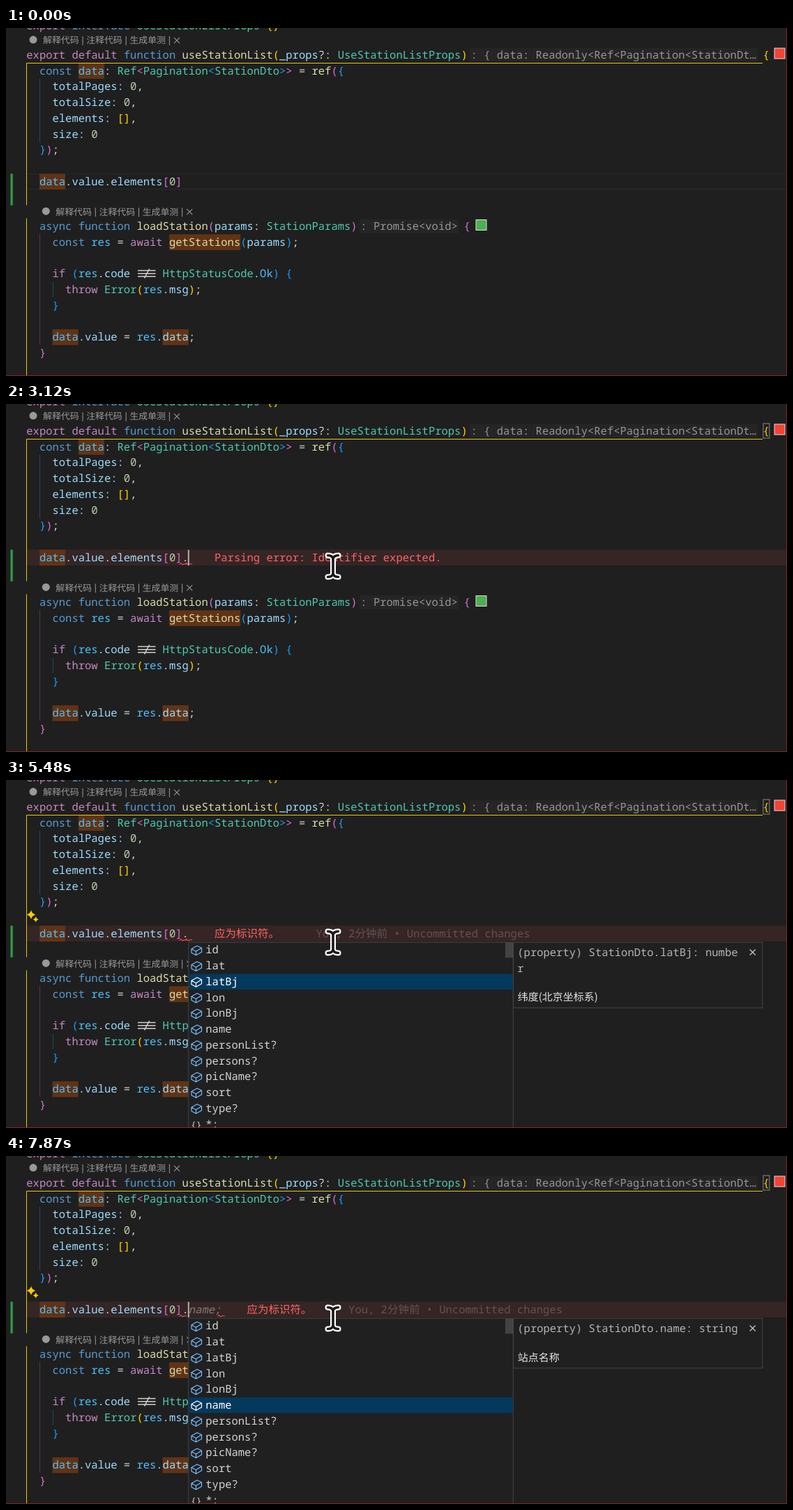
Recreate the animation shown at these times as an HTML page. Size 1120x500 px, loop 8 s.

```html
<!DOCTYPE html>
<html lang="zh-CN">
<head>
<meta charset="utf-8">
<title>Editor completion</title>
<style>
html, body { margin: 0; width: 100%; height: 100%; overflow: hidden; background: #1f1f1f; }
svg { display: block; width: 100%; height: 100%; }
text { font: 500 15.5px "Noto Sans Mono", "Noto Sans CJK SC", "Noto Sans CJK", monospace; white-space: pre;
  text-rendering: geometricPrecision; font-variant-ligatures: none; }
.ui { font: 500 15px "Noto Sans CJK SC", "Noto Sans CJK", sans-serif; }
.lens { font-size: 12.9px; font-weight: 400; }
.small { font-size: 13px; }
.ghost { font-style: italic; }
</style>
</head>
<body>
<svg viewBox="0 0 1120 500">
  <g id="code"></g><g id="live"></g>
  <path d="M0 499.5H1119.5V0" fill="none" stroke="#8a2323"/>
</svg>
<script>
const CW = 9.3, LH = 22.75, X0 = 29.3, ROW = 220.6, LOOP = 8000;
const col = n => X0 + n * CW;
const COLORS = {
  k: '#c586c0', b: '#569cd6', f: '#dcdcaa', v: '#9cdcfe', c: '#4fc1ff', t: '#4ec9b0',
  n: '#b5cea8', w: '#d4d4d4', y: '#ffd700', o: '#da70d6', u: '#179fff', h: '#969696'
};
const GOLD = '#e6c619', MARK = '#613315';

// SVG helpers; text is placed by the middle of its line
const text = (x, y, s, fill, cls = '') =>
  `<text x="${x}" y="${y + 5.2}" fill="${fill}" class="${cls}">${s.replace(/&/g, '&amp;').replace(/</g, '&lt;')}</text>`;
const rect = (x, y, w, h, fill, stroke = 'none') =>
  `<rect x="${x}" y="${y}" width="${w}" height="${h}" fill="${fill}" stroke="${stroke}"/>`;
const path = (d, stroke, w = 1, extra = '') =>
  `<path d="${d}" fill="none" stroke="${stroke}" stroke-width="${w}" ${extra}/>`;
const cross = (x, y, r, c) => path(`M${x - r} ${y - r}l${2 * r} ${2 * r}m0 ${-2 * r}l${-2 * r} ${2 * r}`, c, 1.1);
const bracketBox = (x, y) => rect(x + .3, y - 10.5, CW - .4, 21, 'none', '#888');
const mark = (c, n, y) => rect(col(c), y - 11.2, n * CW, LH, MARK);

// "~k" switches colour to COLORS.k
function code(x, y, src) {
  return src.split('~').slice(1).map(part => {
    const s = part.slice(1), out = text(x, y, s, COLORS[part[0]]);
    x += s.length * CW;
    return out;
  }).join('');
}

function lens(x, y) {
  return `<circle cx="${x + 9}" cy="${y - 1}" r="5.5" fill="#999"/>` +
    ['解释代码', '注释代码', '生成单测'].map((s, i) =>
      text(x + 23 + i * 62.2, y - .8, s, '#999', 'ui lens') +
      rect(x + 79.5 + i * 62.2, y - 6, 1, 13, '#999')).join('') +
    cross(x + 215, y, 4, '#999');
}

function drawCode() {
  const top = ROW - 8 * LH, low = ROW + 64.2;
  const upper = i => top + i * LH, lower = i => low + i * LH;
  const guide = (x, y1, y2, c) => path(`M${x} ${y1}V${y2}`, c);
  return [
    mark(8, 4, upper(1)), mark(22, 11, lower(1)), mark(4, 4, lower(7)), mark(21, 4, lower(7)),
    rect(665, top - 10, 413, 20, '#252525'), rect(506.5, low - 10, 143, 20, '#252525'),
    guide(48.5, 73, 164, '#2b4766'), guide(48.5, 296, 455, '#573757'), guide(67.5, 364, 387, '#1d4562'),
    path('M1085 50.5H29.5V254.5M29.5 273.5V500', GOLD),
    rect(6.5, 209.3, 3.2, 45.5, '#2ea043'),
    code(col(0), top - LH - 18.7, '~kexport ~binterface ~tUseStationListProps ~y{}'),
    lens(30, 17.8),
    code(col(0), top, '~kexport default ~bfunction ~fuseStationList~y(~v_props~w?: ~tUseStationListProps~y)'),
    text(666.6, top, ': { data: Readonly<Ref<Pagination<StationDt…', COLORS.h),
    text(1085.6, top, '{', COLORS.y),
    rect(1102, 29, 15, 15, '#f44336', '#ddd'),
    code(col(2), upper(1), '~bconst ~cdata~w: ~tRef~o<~tPagination~u<~tStationDto~u>~o>~w = ~fref~o(~u{'),
    code(col(4), upper(2), '~vtotalPages: ~n0~w,'),
    code(col(4), upper(3), '~vtotalSize: ~n0~w,'),
    code(col(4), upper(4), '~velements: ~y[]~w,'),
    code(col(4), upper(5), '~vsize: ~n0'),
    code(col(2), upper(6), '~u}~o)~w;'),
    lens(48.3, 264.2),
    code(col(2), low, '~basync function ~floadStation~o(~vparams~w: ~tStationParams~o)'),
    text(508.3, low, ': Promise<void>', COLORS.h),
    text(656.5, low, '{', COLORS.o),
    rect(674, 275.5, 15, 15, '#4caf50', '#ddd'),
    code(col(4), lower(1), '~bconst ~cres~w = ~kawait ~fgetStations~u(~vparams~u)~w;'),
    code(col(4), lower(3), '~kif ~u(~cres~w.~vcode'),
    path('M189 348.6h25.5m0 4.2h-25.5m0 4.2h25.5M198.5 359.5l7 -13.5', COLORS.w, 1.5),
    code(col(21), lower(3), '~tHttpStatusCode~w.~cOk~u) {'),
    code(col(6), lower(4), '~kthrow ~tError~y(~cres~w.~vmsg~y)~w;'),
    code(col(4), lower(5), '~u}'),
    code(col(4), lower(7), '~cdata~w.~vvalue~w = ~cres~w.~vdata~w;'),
    code(col(2), lower(8), '~o}')
  ].join('');
}

const ITEMS = ['id', 'lat', 'latBj', 'lon', 'lonBj', 'name', 'personList?', 'persons?', 'picName?', 'sort', 'type?'];
const NOTES = ['', '纬度', '纬度(北京坐标系)', '经度', '经度(北京坐标系)', '站点名称'];
const WAIT = -1, NONE = -2;

// Each track: [start, value], held until the next entry
const MOUSE = [[0, null], [80, [551, 355]], [160, [513, 314]], [250, [485, 289]], [330, [471, 276]],
  [510, [468, 269]], [560, [464, 261]], [620, [462, 256]], [840, [463, 252]], [920, [464, 247]],
  [1000, [466, 241]], [1100, [468, 236]], [1200, [469, 234]], [1380, [469, 233]]];
const BLINK = [1060, 1560, 2090, 2540, 2910, 3420, 3900, 4400, 4870, 5480, 5820, 6290, 6810, 7320, 7800];
const GHOST = [[0, ''], [3730, 'id = 0;'], [4450, ''], [7450, 'name;']];
const PICK = [[0, NONE], [3730, 0], [4450, 1], [4750, 2], [5620, 3], [6550, 4], [7320, 5]];
const DETAIL = [[0, NONE], [3980, WAIT], [4230, 0], [4750, 1], [4870, WAIT], [5100, 2], [5880, WAIT],
  [6080, 3], [6810, WAIT], [7030, 4], [7660, WAIT], [7870, 5]];
const held = (track, t) => track.filter(k => k[0] <= t).pop()[1];

function squiggle(x) {
  return path(`M${x} 230.5q1.3 -3 2.6 -1t2.6 1t2.6 -1t2 1`, '#f14c4c', 1.2);
}

function currentLine(t) {
  const typed = t >= 2910, error = t >= 3080, ghost = held(GHOST, t);
  const dotEnd = col(25), end = dotEnd + ghost.length * CW, msg = end + 4 * CW;
  let s = error ? rect(30, 209.3, 1090, LH, '#352525') : path('M30 209.8H1120M30 231.5H1120', '#2a2a2a');
  s += mark(2, 4, ROW);
  s += code(col(2), ROW, '~cdata~w.~vvalue~w.~velements~o[~n0~o]' + (typed ? '~w.' : ''));
  if (t >= 1060 && !typed) s += bracketBox(col(21), ROW) + bracketBox(col(23), ROW);
  if (typed) s += bracketBox(1085.6, ROW - 8 * LH);
  if (error) {
    s += squiggle(249) + squiggle(end - 4.6);
    s += text(dotEnd, ROW, ghost, '#857c7c', 'ghost');
    s += text(msg, ROW, t < 3200 ? 'Parsing error: Identifier expected.' : '应为标识符。', '#ff6464');
    if (t >= 3300) s += text(msg + 145.6, ROW, 'You, 2分钟前 • Uncommitted changes', '#625353');
  }
  if (BLINK.filter(b => b <= t).length % 2) s += rect((typed ? dotEnd : col(24)) - 1, 209.5, 2, 22.5, '#aeafad');
  return s;
}

function popup(pick) {
  const y = i => 244.2 + i * LH;
  let s = rect(261.8, 233.3, 465.5, 280, '#202020', '#454545');
  s += rect(262.3, y(pick) - 11.1, 464.5, LH - .3, '#04395e');
  if (pick > 0) s += rect(716, 233.8, 11, 21.5, '#79797966');
  ITEMS.forEach((name, i) => {
    const on = i === pick;
    s += path('M266 -2L274 -6.5L280.5 -3.5V2.5L272.5 7L266 3.5ZL272.5 1.5L280.5 -3.5M272.5 1.5V7',
      on ? '#fff' : '#75beff', 1.2, `stroke-linejoin="round" transform="translate(0 ${y(i) + .5})"`);
    s += text(286.3, y(i), name, on ? '#fff' : '#d4d4d4');
  });
  return s + text(265, y(11), '{}', '#ccc', 'small') + text(286.3, y(11), '*:', '#d4d4d4');
}

function detail(id) {
  const sig = id === WAIT ? '' : `(property) StationDto.${ITEMS[id]}: ${id === 5 ? 'string' : 'number'}`;
  const wrap = sig.length > 34, note = NOTES[id];
  const h = wrap ? 94 : note ? 71.5 : 45.7;
  let s = rect(727.5, 233.3, 357.3, h, '#202020', '#454545') + cross(1070.7, 247.5, 4, '#ccc');
  if (id === WAIT) return s + text(733.7, 248, '正在加载...', '#bbb', 'ui');
  s += text(733.3, 248, sig.slice(0, 34), '#b4b4b4') + text(733.3, 270.7, sig.slice(34), '#b4b4b4');
  return s + (note ? text(733.7, wrap ? 312 : 289.3, note, '#e4e4e4', 'ui') : '');
}

function sparkle() {
  const star = (x, y, r) => `<path fill="#fc0" d="M${x} ${y - r}Q${x + r * .2} ${y - r * .2} ${x + r} ${y}` +
    `Q${x + r * .2} ${y + r * .2} ${x} ${y + r}Q${x - r * .2} ${y + r * .2} ${x - r} ${y}Q${x - r * .2} ${y - r * .2} ${x} ${y - r}"/>`;
  return star(36, 193.5, 6.5) + star(42.7, 200.2, 4);
}

function pointer([x, y]) {
  const d = 'M-7.5 -15.5Q-1 -15.5 0 -10.5Q1 -15.5 7.5 -15.5M0 -10.5V10.5M-7.5 15.5Q-1 15.5 0 10.5Q1 15.5 7.5 15.5';
  const at = `transform="translate(${x} ${y})" stroke-linecap="round" stroke-linejoin="round"`;
  return path(d, '#fff', 8, at) + path(d, '#1a1a1a', 3.6, at);
}

function scene(t) {
  const mouse = held(MOUSE, t), pick = held(PICK, t), info = held(DETAIL, t);
  return currentLine(t) + (t >= 4750 ? sparkle() : '') + (pick !== NONE ? popup(pick) : '') +
    (info !== NONE ? detail(info) : '') + (mouse ? pointer(mouse) : '');
}

const live = document.getElementById('live');
document.getElementById('code').innerHTML = drawCode();
const start = performance.now();
let shown = '';
function frame() {
  const next = scene((performance.now() - start) % LOOP);
  if (next !== shown) live.innerHTML = shown = next;
  requestAnimationFrame(frame);
}
frame();
</script>
</body>
</html>
```
